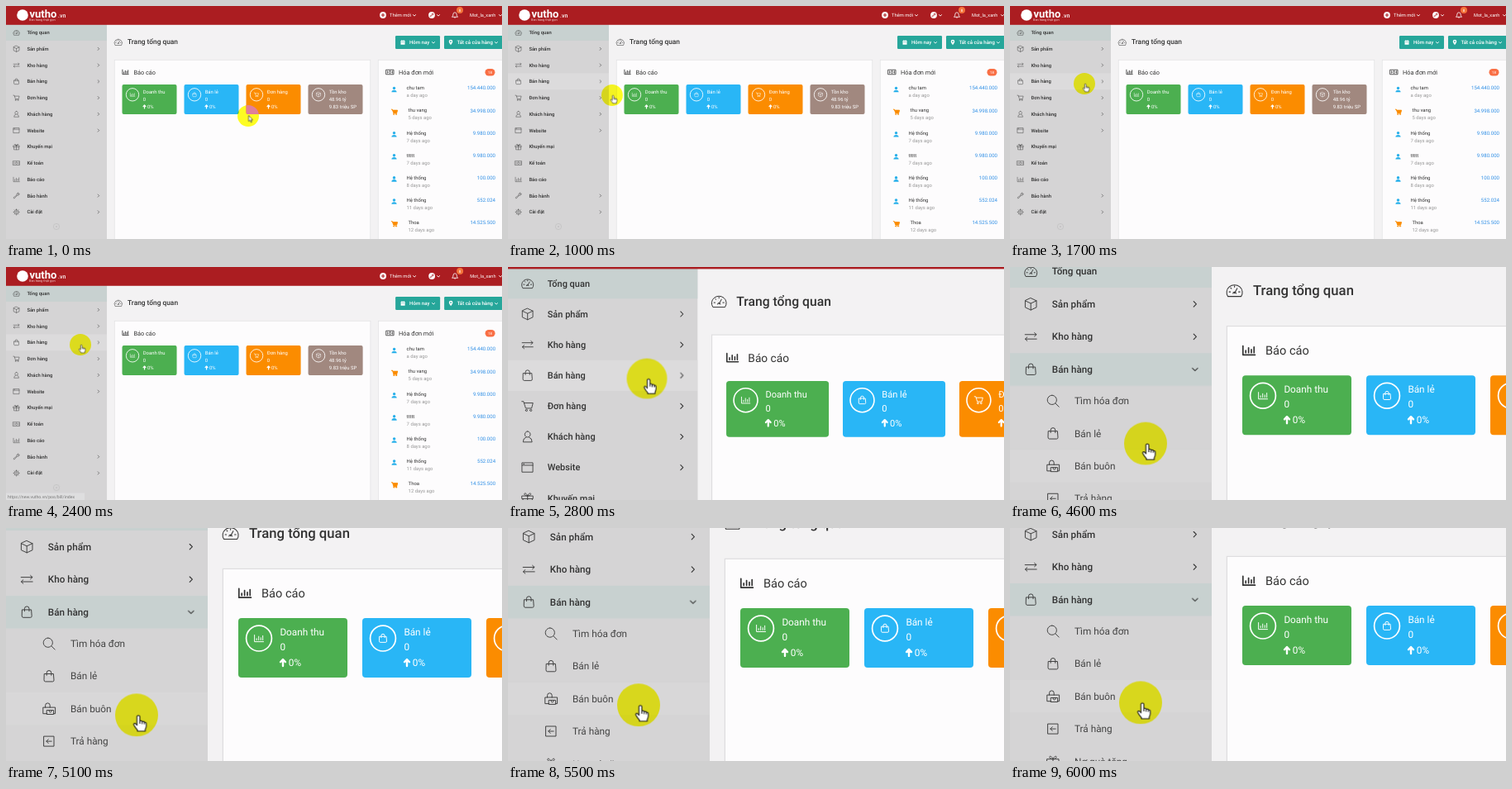
These frames come from a looping animation (600 px wide and 282 px high, 7000 ms). An HTML page:

```html
<!DOCTYPE html>
<html lang="vi">
<head>
<meta charset="utf-8">
<title>Trang tổng quan</title>
<style>
html, body { margin: 0; width: 100%; height: 100%; overflow: hidden; background: #f3f2f3; }
svg { display: block; width: 600px; height: 282px; }
text { font-family: Roboto, "Noto Sans", sans-serif; text-rendering: geometricPrecision; }
.line { fill: none; stroke-linecap: round; stroke-linejoin: round; }

/* The script moves these paused animations along in steps of 100 ms. */
.anim { animation: 7s linear infinite paused; }
#world { animation-name: camera; }
.pointer { animation-name: pointer; }
#spot { mix-blend-mode: multiply; }
#below { animation-name: unfold; }
.flip { animation-timing-function: step-end; }
.hover { animation-name: hover; }
.closed { animation-name: closed; }
.open { animation-name: open; }
.subhover { animation-name: subhover; }
.link { animation-name: link; }
.arrow { animation-name: arrow; }
.hand { animation-name: hand; }

@keyframes camera {
  0%, 34.28% { transform: translateY(0) scale(1); animation-timing-function: ease; }
  43.95% { transform: translateY(-46px) scale(2); }
  60.36% { transform: translateY(-46px) scale(2); animation-timing-function: cubic-bezier(.3, .2, .6, 1); }
  82.8%, 100% { transform: translateY(-96px) scale(2); }
}
@keyframes pointer {
  0% { transform: translate(293px, 133px); animation-timing-function: ease-in; }
  11.43% { transform: translate(249px, 129px); }
  14.28% { transform: translate(126px, 108px); animation-timing-function: ease-out; }
  21.4%, 34.28% { transform: translate(90px, 94px); }
  40%, 58.5% { transform: translate(89.4px, 93.4px); animation-timing-function: ease-in-out; }
  70%, 100% { transform: translate(79px, 153.7px); }
}
@keyframes unfold {
  0%, 51.43% { transform: translateY(0); animation-timing-function: ease-in-out; }
  58.57%, 100% { transform: translateY(157px); }
}
@keyframes hover { 0% { opacity: 0 } 11.42% { opacity: 1 } 57.1% { opacity: 0 } 100% { opacity: 0 } }
@keyframes closed { 0% { opacity: 1 } 57.1% { opacity: 0 } 100% { opacity: 0 } }
@keyframes open { 0% { opacity: 0 } 57.1% { opacity: 1 } 100% { opacity: 1 } }
@keyframes subhover { 0% { opacity: 0 } 65.7% { opacity: 1 } 100% { opacity: 1 } }
@keyframes link { 0% { opacity: 0 } 28.5% { opacity: 1 } 100% { opacity: 1 } }
@keyframes arrow { 0% { opacity: 1 } 12.8% { opacity: 0 } 100% { opacity: 0 } }
@keyframes hand { 0% { opacity: 0 } 12.8% { opacity: 1 } 100% { opacity: 1 } }
</style>
</head>
<body>
<svg viewBox="0 0 600 282">
  <defs><clipPath id="orangeCard"><rect x="290.5" y="95" width="66" height="36" rx="2"/></clipPath></defs>
  <g id="world" class="anim"></g>
</svg>
<script>
const icons = {
  gauge: 'M-3.2 2.9A3.8 3.6 0 1 1 3.2 2.9ZM0 1.4L1.3-1M-.7 1.5a.7.7 0 0 1 1.4 0M-2.6.7h.6M-1.9-1.3l.4.4M0-2.1v.5M2 .7h.6',
  cube: 'M0-3.6L3.4-2V2L0 3.6-3.4 2V-2ZM-3.4-2L0-.4 3.4-2M0-.4V3.6',
  swap: 'M-3.5-1.3H3.4L2.2-2.4M3.4-1.3L2.2-.2M3.5 1.4H-3.4L-2.2.3M-3.4 1.4L-2.2 2.5',
  bag: 'M-2.7-1.4H2.7L3 2.4Q3 3.3 2.2 3.3H-2.2Q-3 3.3-3 2.4ZM-1.4-.5V-2A1.4 1.4 0 0 1 1.4-2V-.5',
  cart: 'M-3.7-3H-2.6L-1.2 1.4H2.6L3.5-2H-2.2M-1.3 2.7a.6.6 0 1 0 1.2 0a.6.6 0 1 0-1.2 0M1.5 2.7a.6.6 0 1 0 1.2 0a.6.6 0 1 0-1.2 0',
  user: 'M0-3.5a1.8 1.9 0 1 0 .01 0M-1 .3Q-2.9.9-2.9 3.4H2.9Q2.9.9 1 .3',
  page: 'M-3.4-3H3.4V3H-3.4ZM-3.4-1.4H3.4M-2.6-2.2h.4',
  gift: 'M-3.5-1.4H3.5V.4H-3.5ZM-3 .4V3.5H3V.4M0-1.4V3.5M0-1.4C-4-1.8-1.5-5 0-1.4C1.5-5 4-1.8 0-1.4',
  money: 'M-3.9-2.4H3.9V2.4H-3.9ZM0-1.2a1.2 1.2 0 1 0 .01 0M-2.6-1v2M2.6-1v2',
  chart: 'M-3.6-2.6V2.8H3.7M-1.9 1.5V.2M-.2 1.5V-1.5M1.5 1.5V-.4M3.1 1.5V-2',
  wrench: 'M.3-.9A2.2 2.2 0 0 1 2.6-3.6L1.6-2.1 2.2-1.5 3.6-2.5A2.2 2.2 0 0 1 .9-.3L-2.4 3.3A.8.8 0 0 1-3.4 2.3Z',
  gear: 'M0-1.2a1.2 1.2 0 1 0 .01 0M0-2.7a2.7 2.7 0 1 0 .01 0M0-2.7v-.9M0 2.7v.9M-2.7 0h-.9M2.7 0h.9M1.9 1.9l.6.6M-1.9-1.9l-.6-.6M1.9-1.9l.6-.6M-1.9 1.9l-.6.6',
  search: 'M-.6-3.4a2.8 2.8 0 1 0 .01 0M1.4 1.4L3.6 3.6',
  register: 'M-1.2 3H-3.6V-.8H3.8V3H2.8M-2.2-.8V-2A1.4 1.4 0 0 1 .6-2V-.8M-1.2.9H2.8V3.4H-1.2ZM0 .9Q0 2.2.8 2.2T1.6.9',
  back: 'M-3-3H3V3H-3ZM1.6 0H-1.6L-.4-1.2M-1.6 0L-.4 1.2',
  bell: 'M-3.2 2Q-2.1 1-2.1-1A2.1 2.2 0 0 1 2.1-1Q2.1 1 3.2 2ZM-.8 2.9Q0 3.8.8 2.9',
  up: 'M-1.5-.3L0-1.9 1.5-.3M0-1.6V2.1',
  right: 'M-.8-1.6L.8 0-.8 1.6',
  down: 'M-1.6-.7L0 .8 1.6-.7'
};
const person = 'M0-3.4a1.7 1.7 0 1 0 .01 0M-3.1 3.2Q-3.1.6 0 .6T3.1 3.2Z';
const pin = 'M0 3.2Q-2.3.2-2.3-1A2.3 2.3 0 0 1 2.3-1Q2.3.2 0 3.2M0-1.8a.8.8 0 1 0 .01 0';

const at = (x, y, body, cls = '') => `<g transform="translate(${x} ${y})"><g class="${cls}">${body}</g></g>`;
const rect = (x, y, w, h, fill, more = '') => `<rect x="${x}" y="${y}" width="${w}" height="${h}" fill="${fill}" ${more}/>`;
const circle = (x, y, r, fill, more = '') => `<circle cx="${x}" cy="${y}" r="${r}" fill="${fill}" ${more}/>`;
const icon = (name, x, y, color = '#3c3c3c', width = .48, scale = 1) =>
  `<path class="line" d="${icons[name]}" stroke="${color}" stroke-width="${width}" transform="translate(${x} ${y}) scale(${scale})"/>`;
const solid = (d, x, y, fill) => `<path d="${d}" fill="${fill}" fill-rule="evenodd" transform="translate(${x} ${y})"/>`;
const chevron = (name, x, y) => icon(name, x, y, '#333', .55);
// y is the middle of the capitals
const text = (s, x, y, size = 5.9, fill = '#333', weight = 400, more = '') =>
  `<text x="${x}" y="${y + size * .35}" font-size="${size}" fill="${fill}" font-weight="${weight}" ${more}>${s}</text>`;

const grey = '#d5d4d5', teal = '#c8d1d0', white = '#fff', rowStep = 19.75;
const rowY = i => 32.1 + rowStep * i;
const rowBack = (y, fill, cls = '') => rect(0, y - rowStep / 2, 122, rowStep, fill, `class="${cls}"`);

const menu = [
  ['gauge', 'Tổng quan', 0], ['cube', 'Sản phẩm', 1], ['swap', 'Kho hàng', 1], ['bag', 'Bán hàng', 0],
  ['cart', 'Đơn hàng', 1], ['user', 'Khách hàng', 1], ['page', 'Website', 1], ['gift', 'Khuyến mại', 0],
  ['money', 'Kế toán', 0], ['chart', 'Báo cáo', 0], ['wrench', 'Bảo hành', 1], ['gear', 'Cài đặt', 1]
].map(([name, label, more], i) =>
  icon(name, 12.6, rowY(i)) + text(label, 25.4, rowY(i), 5.85, '#333', 500) +
  (more ? chevron('right', 111.9, rowY(i)) : ''));

function sidebar() {
  const sell = rowY(3);
  const subs = [['search', 'Tìm hóa đơn'], ['bag', 'Bán lẻ'], ['register', 'Bán buôn'], ['back', 'Trả hàng'], ['gift', 'Nợ quà tặng']];
  const subY = i => sell + 19.1 + 19.7 * i;
  return rect(0, 22, 122, 400, grey) + rowBack(rowY(0), teal) +
    rowBack(subY(2), '#d8d7d8', 'anim flip subhover') +
    subs.map(([name, label], i) => icon(name, 26, subY(i)) + text(label, 39, subY(i), 5.9, '#444')).join('') +
    `<g id="below" class="anim">${rect(0, sell + rowStep / 2, 122, 300, grey)}${menu.slice(4).join('')}</g>` +
    rowBack(sell, '#dcdbdc', 'anim flip hover') + rowBack(sell, teal, 'anim flip open') +
    menu.slice(0, 4).join('') +
    at(111.9, sell, chevron('right', 0, 0), 'anim flip closed') +
    at(111.9, sell, chevron('down', 0, 0), 'anim flip open') +
    circle(61, 267, 3.6, 'none', 'stroke="#bdbcbd" stroke-width=".6"') + circle(61, 267, 1, '#c2c1c2') +
    `<g class="anim flip link">${rect(0, 273.5, 95, 8.5, '#dededf')}${text('https://new.vutho.vn/pos/bill/index', 2, 278, 5.2, '#777')}</g>`;
}

function header() {
  return rect(0, 0, 600, 22.8, '#ab1d21') +
    circle(20, 11, 6.8, white) +
    text('vutho', 28.5, 9, 13, white, 700) + text('.vn', 63, 11.5, 7, white, 500) +
    text('Bán hàng thật gọn', 28, 17, 3.9, '#efc9ca') +
    circle(456, 11, 3.9, white) + '<path d="M453.8 11h4.4M456 8.8v4.4" stroke="#ab1d21" stroke-width="1.1"/>' +
    text('Thêm mới', 464, 11, 5.8, white) + icon('down', 494, 11.3, white, .9) +
    circle(515, 11, 3.9, white) + icon('wrench', 515, 11, '#ab1d21', .9, .62) + icon('down', 523, 11.3, white, .9) +
    icon('bell', 543, 11, white, .8) + circle(549, 5, 4, '#f4743b') + text('8', 547.7, 5, 4.6, white) +
    text('Mot_la_xanh', 561, 11, 5.6, white) + icon('down', 598, 11.3, white, .9);
}

function button(x, w, label, mark) {
  return rect(x, 36, w, 16, '#26a69a', 'rx="1.2"') + mark + text(label, x + (w < 60 ? 17 : 15.5), 44, 6.1, white, 500) +
    icon('down', w < 60 ? 517 : 593, 44.3, white, .9);
}

function card(i, fill, name, lines) {
  const x = 140.5 + 75 * i;
  return rect(x, 95, 66, 36, fill, 'rx="2"') +
    circle(x + 12.5, 107.3, 7.7, 'none', 'stroke="#fff" stroke-width=".85"') +
    icon(name, x + 12.5, 107.2, white, .65, .75) +
    lines.map((s, k) => {
      const y = [103.6, 112.6, 121.9][k], rise = s === '0%';
      return (rise ? icon('up', x + 27, y, white, 1.2) : '') + text(s, x + (rise ? 30.4 : 25.2), y, 5.9, white);
    }).join('');
}

function invoices() {
  return [
    ['chu tam', 'a day', '154.440.000'], ['thu vang', '5 days', '34.998.000', 1],
    ['Hệ thống', '7 days', '9.980.000'], ['ttttt', '7 days', '9.980.000'],
    ['Hệ thống', '8 days', '100.000'], ['Hệ thống', '11 days', '552.024'], ['Thoa', '12 days', '14.525.500', 1]
  ].map(([name, age, sum, order], i) => {
    const y = 99.3 + 27.1 * i, x = order ? 486.5 : 484.5;
    const mark = order
      ? solid('M-2.4-2.2H3.6L2.6 1.4H-1.2Z', 470, y + 1.8, '#fb8c00') + icon('cart', 470, y + 1.8, '#fb8c00', 1)
      : solid(person, 469.5, y + 1.8, '#29b0ea');
    return mark + text(name, x, y) + text(age + ' ago', x, y + 9, 5.9, '#999') +
      text(sum, 592, y, 6.1, '#2f8fe6', 400, 'text-anchor="end"');
  }).join('');
}

function content() {
  const border = 'stroke="#dedddf" stroke-width=".6"';
  const calendar = solid('M-2.5-2h1v-1h.8v1h1.4v-1h.8v1h1V2.8H-2.5ZM-1.7-.6V0H1.7V-.6Z', 480, 44, white);
  const rise = label => [label, '0', '0%'];
  return rect(0, 0, 600, 400, '#f3f2f3') +
    icon('gauge', 135.8, 43.6, '#333', .42, 1.25) + text('Trang tổng quan', 147, 43.5, 8.35, '#333', 500) +
    button(471, 54, 'Hôm nay', calendar) +
    button(530, 74, 'Tất cả cửa hàng', solid(pin, 538, 44, white)) +
    rect(131.2, 65.2, 309.6, 330, '#fdfcfd', border) + rect(450.2, 65.2, 170, 330, '#fdfcfd', border) +
    icon('chart', 144.5, 79.8, '#333', .85) + text('Báo cáo', 154.5, 80, 7.3) +
    card(0, '#4caf50', 'chart', rise('Doanh thu')) + card(1, '#29b6f6', 'bag', rise('Bán lẻ')) +
    card(2, '#fb8c00', 'cart', rise('Đơn hàng')) + card(3, '#a1887f', 'cube', ['Tồn kho', '48.96 tỷ', '9.83 triệu SP']) +
    icon('money', 464.5, 80, '#333', .7, 1.15) + text('Hóa đơn mới', 475, 80, 7.35) +
    rect(579.5, 76, 12, 8.4, '#f96f45', 'rx="4.2"') + text('18', 583, 80.2, 4.4, white) +
    invoices();
}

function pointer() {
  const tip = '<path d="M0 0V7.2L1.7 5.7 2.9 8.3 4 7.8 2.9 5.3H5Z" fill="#fff" stroke="#111" stroke-width=".6"/>';
  const finger = '<path d="M-2 10V1.5Q-2 0-.3 0T1.5 1.5V6.5Q4 5.8 4.2 7.5Q6.8 6.8 7 8.3Q9.3 8 9.3 10V13Q9 15 8 17V19H-1.5V17.6Q-4 15-5.8 11.5Q-6.3 9.5-4.5 9.5Q-3 10-2 12ZM4.2 7.5V10.5M7 8.3V10.8M1.5 6.5V10" transform="scale(.5)" fill="#fff" stroke="#111" stroke-width="1.1" stroke-linejoin="round"/>';
  return circle(0, 0, 13, '#ffff22', 'id="spot" class="anim pointer"') +
    `<g clip-path="url(#orangeCard)">${circle(0, 0, 13, '#e0809a', 'class="anim pointer"')}</g>` +
    `<g class="anim pointer">${at(.5, -.5, tip, 'anim flip arrow')}${at(1.2, .2, finger, 'anim flip hand')}</g>`;
}

document.getElementById('world').innerHTML = content() + sidebar() + header() + pointer();

const start = performance.now(), moves = document.getAnimations();
function tick() {
  const time = Math.floor((performance.now() - start) / 100) * 100 % 7000;
  for (const move of moves) move.currentTime = time;
  requestAnimationFrame(tick);
}
tick();
</script>
</body>
</html>
```
